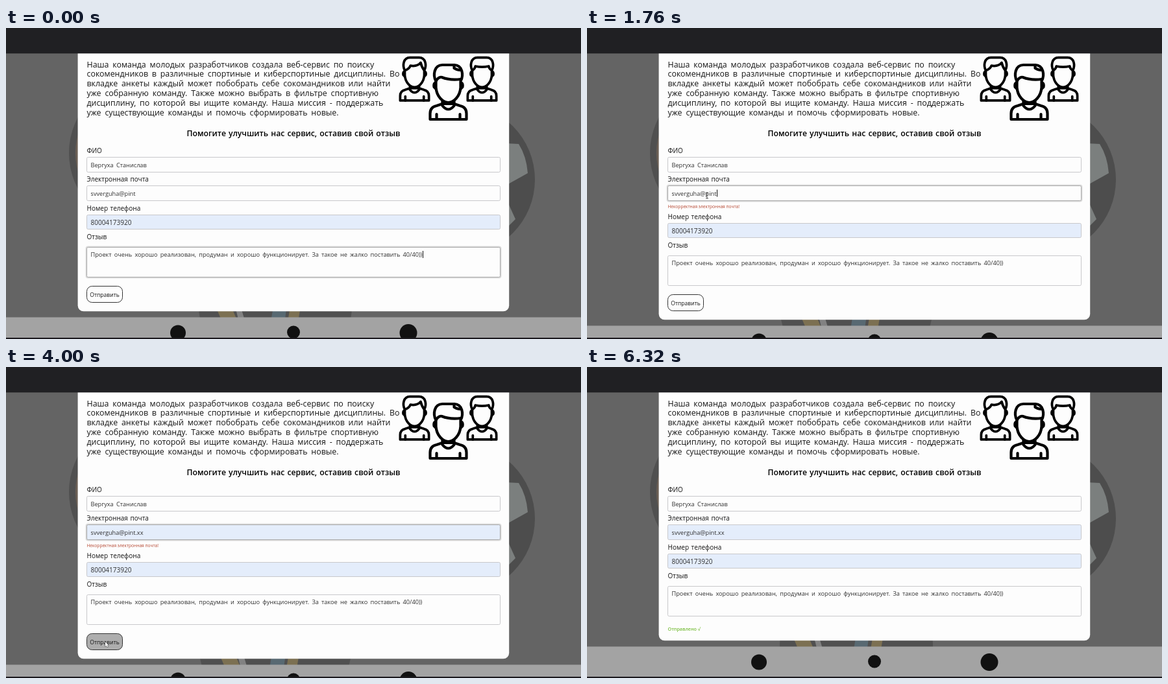
Animation, 886 px wide and 480 px high, one loop 6.76 s. Source, as an HTML page with a canvas:

```html
<!DOCTYPE html>
<html lang="ru">
<head>
<meta charset="utf-8">
<title>Отзыв</title>
<style>
  html, body { margin: 0; width: 100%; height: 100%; overflow: hidden; background: #646464; }
  canvas { display: block; }
</style>
</head>
<body>
<canvas id="stage" width="886" height="480"></canvas>
<script>
const ctx = document.getElementById('stage').getContext('2d');
const LOOP = 6760;
const FAMILY = '"Open Sans", "Noto Sans", sans-serif';
const PAPER = '#fdfdfd', AUTOFILL = '#e4edfb', INK = '#151515';

const REJECTED = 680, FOCUSED = 1560, SUGGESTED = 2040, ACCEPTED = 2360, SENT = 4520;

const INTRO = [
  'Наша команда молодых разработчиков создала веб-сервис по поиску',
  'сокомендников в различные спортиные и киберспортиные дисциплины. Во',
  'вкладке анкеты каждый может побобрать себе сокомандников или найти',
  'уже собранную команду. Также можно выбрать в фильтре спортивную',
  'дисциплину, по которой вы ищите команду. Наша миссия - поддержать',
  'уже существующие команды и помочь сформировать новые.'
];
const REVIEW = 'Проект очень хорошо реализован, продуман и хорошо функционирует. ' +
  'За такое не жалко поставить 40/40))';

// Each track is a stretch of time in which the pointer is visible: [ms, x, y].
const TRACKS = [
  [[200, 300, 380], [600, 145, 406], [720, 145, 406], [1120, 165, 338], [1520, 185, 254], [2040, 185, 254]],
  [[2760, 190, 300], [3120, 153, 424], [5000, 153, 424], [5640, 166, 415], [6300, 830, 330]]
];

function pointerAt(t) {
  for (const track of TRACKS) {
    for (let i = 1; i < track.length; i++) {
      const [t0, x0, y0] = track[i - 1], [t1, x1, y1] = track[i];
      if (t < t0 || t >= t1) continue;
      const u = (t - t0) / (t1 - t0), k = u * u * (3 - 2 * u);
      return { x: x0 + (x1 - x0) * k, y: y0 + (y1 - y0) * k };
    }
  }
  return null;
}

const inside = (p, x, y, w, h) => p && p.x >= x && p.x <= x + w && p.y >= y && p.y <= y + h;

function text(str, x, y, size, { color = INK, weight = 400, gap = 0, align = 'left' } = {}) {
  ctx.font = `${weight} ${size}px ${FAMILY}`;
  ctx.wordSpacing = gap + 'px';
  ctx.textAlign = align;
  ctx.fillStyle = color;
  ctx.fillText(str, x, y);
  return ctx.measureText(str).width;
}

function rect(x, y, w, h, color) {
  ctx.fillStyle = color;
  ctx.fillRect(x, y, w, h);
}

function box(x, y, w, h, r, fill, stroke) {
  ctx.beginPath();
  ctx.roundRect(x, y, w, h, r);
  if (fill) { ctx.fillStyle = fill; ctx.fill(); }
  if (stroke) { ctx.strokeStyle = stroke; ctx.lineWidth = 1; ctx.stroke(); }
}

function disc(x, y, r, color) {
  ctx.fillStyle = color;
  ctx.beginPath();
  ctx.arc(x, y, r, 0, 7);
  ctx.fill();
}

function shape(d, color) {
  ctx.fillStyle = color;
  ctx.fill(new Path2D(d));
}

function backdrop() {
  rect(0, 0, 886, 480, '#646464');
  disc(214, 193, 117, '#505050');
  disc(214, 193, 107, '#6b5f55');
  disc(698, 234, 117, '#4d4d4d');
  shape('M770 178 L790 179 Q802 198 804 224 L770 243Z M770 262 L785 295 L770 310Z', '#7b7f7e');

  ctx.save();
  disc(415, 428, 118, '#505050');
  ctx.beginPath();
  ctx.arc(415, 428, 118, 0, 7);
  ctx.clip();
  shape('M350 418 H358 L372 465 H362Z', '#828282');
  shape('M318 418 H342 L362 465 H338Z M440 418 H456 L448 465 H432Z', '#7c7052');
  shape('M414 418 H434 L428 465 H406Z', '#586972');
  ctx.restore();
}

function footer(y) {
  rect(0, y, 886, 480 - y, '#a3a3a3');
  disc(265, y + 24, 12, '#111');
  disc(443, y + 23, 10, '#111');
  disc(620, y + 24, 13.5, '#111');
  rect(0, 478, 886, 2, '#1c1a1e');
}

// A head-and-shoulders line icon centred on x, 88 units high.
function person(x, y, scale, hair) {
  const body = 'M-28 86 V77 Q-28 67 -18 65 L-9 62 H9 L18 65 Q28 67 28 77 V86Z';
  const ears = 'M-19 29 Q-23 30 -22 36 L-18 40 M19 29 Q23 30 22 36 L18 40';
  const head = 'M-19 27 V37 C-18 51 -8 60 0 60 C8 60 18 51 19 37 V27' +
    ' C24 18 22 2 9 2 H-9 C-22 2 -24 18 -19 27Z';
  ctx.save();
  ctx.translate(x, y);
  ctx.scale(scale, scale);
  ctx.lineWidth = 4.2 / Math.sqrt(scale);
  ctx.lineJoin = ctx.lineCap = 'round';
  ctx.strokeStyle = '#000';
  ctx.fillStyle = PAPER;
  for (const d of [body, ears, head]) {
    const path = new Path2D(d);
    ctx.fill(path);
    ctx.stroke(path);
  }
  ctx.stroke(new Path2D(hair + ' M-9 58 V65 Q0 76 9 65 V58 M-18 78 V86 M18 78 V86'));
  ctx.restore();
}

function people() {
  person(629.5, 44, 0.79, 'M-19 27 Q-11 25 -8 18 Q6 20 12 12 Q14 21 19 27');
  person(733.5, 44, 0.79, 'M-19 27 Q-14 24 -13 19 Q0 22 13 19 Q14 24 19 27');
  person(681.5, 55, 1, 'M-19 27 Q-15 20 -10 21 Q2 26 19 24 M9 2 V7 Q14 10 18 10');
}

function field(y, h, { fill = PAPER, focus = false } = {}) {
  if (focus) box(122.5, y - 2, 641, h + 4, 4, '#dcdcdc');
  box(124.5, y, 637, h, 2, fill, focus ? '#a8a8a8' : '#c8c8cb');
}

function fieldText(str, y, caret, size = 9.2) {
  const width = text(str, 130.5, y, size, { color: '#303030', gap: 1.8 });
  if (caret) rect(Math.round(131 + width), y - 9, 1, 11, '#111');
}

function label(str, y) {
  text(str, 124.5, y, 10, { gap: 1 });
}

function drawPointer(p, overText) {
  ctx.save();
  ctx.translate(p.x, p.y);
  ctx.lineWidth = 0.9;
  if (overText) {
    ctx.strokeStyle = '#444';
    ctx.stroke(new Path2D('M-2 0 H2 M0 0 V9 M-2 9 H2'));
  } else {
    const arrow = new Path2D('M0 0 V7.5 L1.8 6 L3 8.6 L4.2 8 L3.1 5.5 H5.2Z');
    ctx.fillStyle = '#fff';
    ctx.strokeStyle = '#333';
    ctx.stroke(arrow);
    ctx.fill(arrow);
  }
  ctx.restore();
}

function draw(t) {
  const sent = t >= SENT;
  const invalid = t >= REJECTED && !sent;
  const shift = invalid ? 13 : 0;
  const bottom = sent ? 422.3 : 437.3 + shift;
  const suggested = t >= SUGGESTED;
  const emailFocus = t >= FOCUSED && !sent;
  const emailCaret = (t >= FOCUSED && t < SUGGESTED) || (t >= ACCEPTED && t < 2880) ||
    (t >= 3440 && t < 4000) || (t >= 4480 && !sent);
  const pointer = pointerAt(t);

  backdrop();
  footer(bottom + 9.2);
  box(110.6, 20, 664.6, bottom - 20, 9, PAPER);
  rect(0, 0, 886, 39.3, '#202023');
  people();

  INTRO.forEach((line, i) => text(line, 124.5, 60.5 + i * 14.8, 12.4, { gap: 2.6 }));
  text('Помогите улучшить нас сервис, оставив свой отзыв', 443, 166.5, 12.2,
    { weight: 600, gap: 1, align: 'center', color: '#000' });

  label('ФИО', 193);
  field(199.5, 23);
  fieldText('Вергуха Станислав', 214.5);

  label('Электронная почта', 237);
  field(243.5, 23, { fill: suggested ? AUTOFILL : PAPER, focus: emailFocus });
  fieldText(suggested ? 'svverguha@pint.xx' : 'svverguha@pint', 258.5, emailCaret);
  if (invalid) text('Некорректная электронная почта!', 124.5, 278, 6.6, { color: '#b5452f' });

  ctx.save();
  ctx.translate(0, shift);
  label('Номер телефона', 281.5);
  field(288.5, 22, { fill: AUTOFILL });
  fieldText('80004173920', 303.5, false, 10);

  label('Отзыв', 326);
  field(338.5, 46, { focus: t < REJECTED });
  fieldText(REVIEW, 353, t < 320);

  if (sent) {
    text('Отправлено √', 124.5, 407, 7.2, { color: '#79bd3c', weight: 600 });
  } else {
    const hover = inside(pointer, 124.5, 398.5 + shift, 55, 25);
    box(124.5, 398.5, 55, 25, 8, hover ? '#adadad' : PAPER, '#333');
    text('Отправить', 152, 414.5, 8.6, { align: 'center' });
  }
  ctx.restore();

  if (pointer) {
    const overText = inside(pointer, 124.5, 244, 637, 22) ||
      inside(pointer, 124.5, 288 + shift, 637, 22) ||
      inside(pointer, 124.5, 339 + shift, 637, 45);
    drawPointer(pointer, overText);
  }
}

const start = performance.now();
function tick() {
  draw((performance.now() - start) % LOOP);
  requestAnimationFrame(tick);
}
tick();
</script>
</body>
</html>
```
